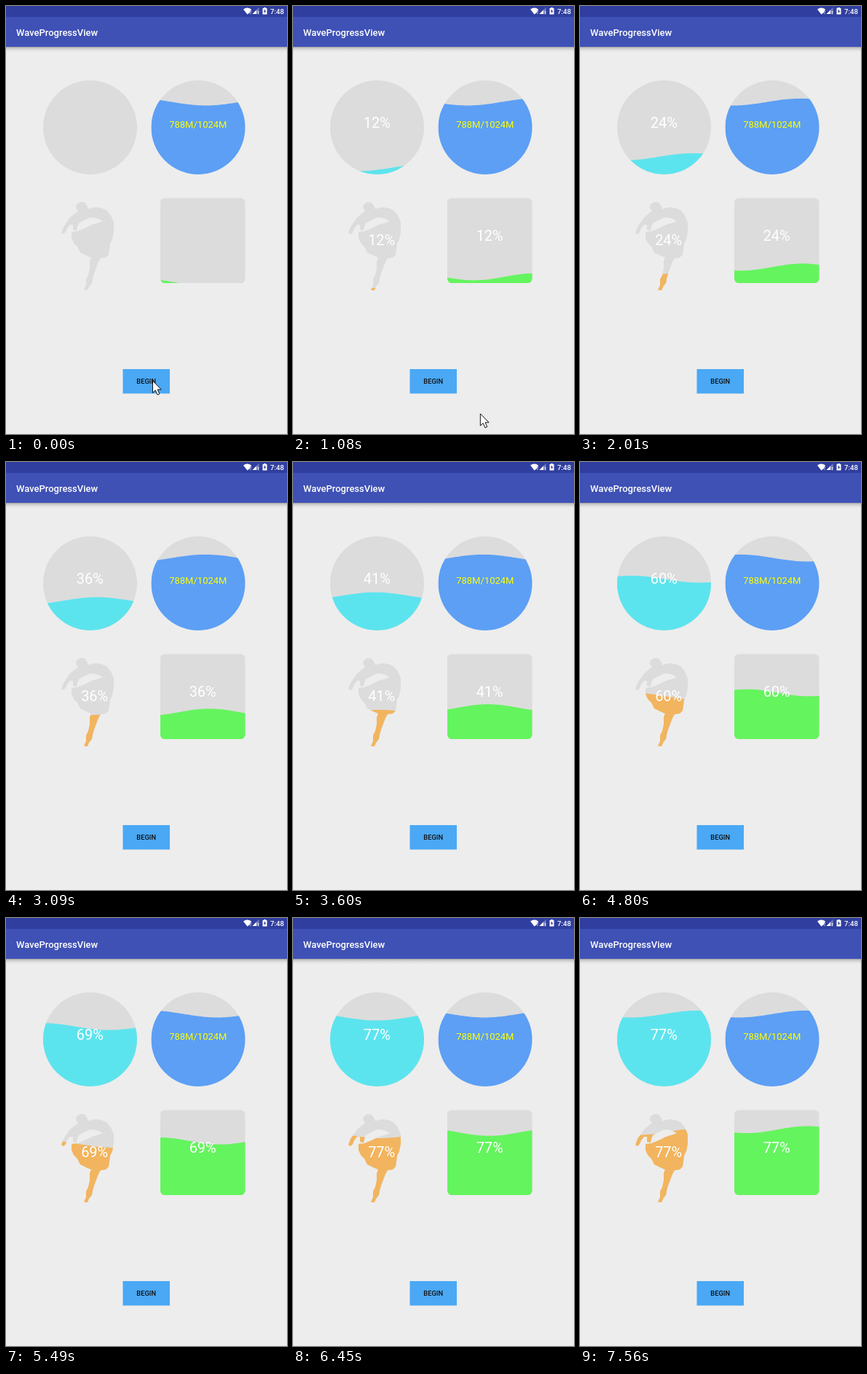
Write an HTML page that moves like this. It is 386 by 587 pixels and loops after 7.66 s.

```html
<!DOCTYPE html>
<html lang="en">
<head>
<meta charset="utf-8">
<title>WaveProgressView</title>
<style>
  html, body { margin: 0; width: 100%; height: 100%; overflow: hidden; background: #ededed; }
  svg { display: block; width: 386px; height: 587px; font-family: Roboto, sans-serif; }
  .medium { font-weight: 500; }
  .percent { font-size: 20px; fill: #fff; text-anchor: middle; }
</style>
</head>
<body>
<svg viewBox="0 0 386 587">
  <defs>
    <linearGradient id="shadow" x2="0" y2="1">
      <stop offset="0" stop-color="#000" stop-opacity=".3"/>
      <stop offset=".4" stop-color="#000" stop-opacity=".1"/>
      <stop offset="1" stop-color="#000" stop-opacity="0"/>
    </linearGradient>
  </defs>
  <rect width="386" height="587" fill="#ededed"/>
  <rect y="56" width="386" height="7" fill="url(#shadow)"/>
  <rect y="14" width="386" height="42" fill="#3f51b5"/>
  <rect width="386" height="15" fill="#303f9f"/>
  <text class="medium" x="14" y="41" font-size="13" fill="#fff">WaveProgressView</text>

  <g fill="#fff">
    <path d="M326 4.5Q331.5 .5 337 4.5L335 7V9L331.5 11.5Z"/>
    <path d="M336 5V9M336 10V11" stroke="#fff"/>
    <path d="M338.5 11L347.5 2V11Z" opacity=".35"/>
    <path d="M338.5 11L344 5.5V11ZM346 7h1.2v2.5H346ZM346 10.2h1.2v1H346Z"/>
    <path d="M352.5 3h1.7V2h2.6v1h1.7v8.5h-6Z"/>
    <path d="M356 4.2L353.8 7.7H355.2V10.2L357.3 6.7H356Z" fill="#303f9f"/>
    <text class="medium" x="363" y="10.7" font-size="9.6">7:48</text>
  </g>

  <g id="views"></g>
  <text x="263.8" y="166.5" font-size="13" fill="#ff0" text-anchor="middle">788M/1024M</text>

  <rect x="160.5" y="498" width="64.5" height="33.5" fill="#4aa8f4"/>
  <text class="medium" x="192.7" y="518.2" font-size="9.3" fill="#111" text-anchor="middle">BEGIN</text>
  <path id="cursor" d="M0 0V16.5L3.8 13L6.6 19.3L9.4 18L6.7 12H11.8Z" fill="#fff" stroke="#111" stroke-linejoin="round"/>
</svg>
<script>
const LOOP = 7660;
const NS = 'http://www.w3.org/2000/svg';
const AMPLITUDE = 4.8;
const GRAY = '#dcdcdc';

const DANCER = 'M97 272L102 269L108 269.5L112 275L113 278.5L122 276L131 277L138 280L144 287' +
  'L148 297V310L146 320L143 326L142 334L141 341L137 345L130 346L127 351L124 359L121 367' +
  'L119 374L118 380L114 385L112 390L107 389.5L110 383V375L113 369L115 360V350L117 345' +
  'L110 342L102 338L98 330L93 325L90 318V310L98 309L108 305L118 300L128 297L133 295' +
  'L125 291L116 290L107 294L100 298L98 303L97 308L92 307V300L88 300L84 305L82 310' +
  'L79 313L76 311L79 303L83 297L88 290L94 285L99 281L96 277Z';

// Each key is [time, value].
const PROGRESS = [[60, 0], [2010, 24], [3090, 36], [4140, 51], [5490, 69], [6100, 77]];
const LEVEL = [[500, 0], [2010, 18.7], [3090, 31.6], [4140, 45.3], [5490, 63.7], [6450, 74], [7000, 77]];
const TROUGH = [[0, .405], [2010, .06], [3090, -.1], [4140, -.275], [5490, -.51], [6450, -.66], [7560, -.9]];
const CURSOR_X = [[500, 201.5], [1080, 255], [1500, 320]];
const CURSOR_Y = [[500, 514], [1080, 558], [1500, 590]];
const BEATS = [150, 1230, 2280, 3360, 4410, 5490, 6570, 7701];

function keyed(keys, t) {
  if (t <= keys[0][0]) return keys[0][1];
  for (let i = 1; i < keys.length; i++) {
    const [t0, a] = keys[i - 1], [t1, b] = keys[i];
    if (t <= t1) return a + (b - a) * (t - t0) / (t1 - t0);
  }
  return keys[keys.length - 1][1];
}

// Eight picture changes per beat.
function stepped(t) {
  t += 15;
  for (let i = BEATS.length - 2; i >= 0; i--) {
    if (t >= BEATS[i]) {
      const step = (BEATS[i + 1] - BEATS[i]) / 8;
      return BEATS[i] + Math.floor((t - BEATS[i]) / step) * step;
    }
  }
  return 0;
}

function add(parent, tag, attrs) {
  const node = document.createElementNS(NS, tag);
  for (const name in attrs) node.setAttribute(name, attrs[name]);
  return parent.appendChild(node);
}

const root = document.getElementById('views');
const cursor = document.getElementById('cursor');

function makeView(id, box, color, tag, shape, label, fixedLevel) {
  const clip = add(root, 'clipPath', { id });
  add(clip, tag, shape);
  add(root, tag, { ...shape, fill: GRAY });
  const wave = add(root, 'path', { fill: color, 'clip-path': `url(#${id})` });
  const text = label && add(root, 'text', { class: 'percent', x: label[0], y: label[1] });
  return { ...box, wave, text, fixedLevel };
}

const disc = cx => ({ cx, cy: 166.5, r: 64.5 });
const views = [
  makeView('cyan', { left: 51, width: 129, bottom: 231, height: 129 },
    '#5ce4ee', 'circle', disc(115.5), [115.3, 166.5]),
  makeView('blue', { left: 199.5, width: 129, bottom: 231, height: 129 },
    '#5c9ff5', 'circle', disc(264), null, 77),
  makeView('dancer', { left: 57, width: 129, bottom: 392, height: 128.5 },
    '#f2b45e', 'path', { d: DANCER }, [121.7, 328]),
  makeView('square', { left: 212, width: 116.5, bottom: 380, height: 116.5 },
    '#64f45e', 'rect', { x: 212, y: 263.5, width: 116.5, height: 116.5, rx: 6 }, [270.2, 322])
];

function wavePath({ left, width, bottom, height }, level, trough) {
  const mid = bottom - height * level / 100;
  const length = width * 1.44;
  let d = `M${left} ${bottom + 9}`;
  for (let x = 0; x <= width + 2; x += 2) {
    const y = mid + AMPLITUDE * Math.cos(2 * Math.PI * (x / length - trough));
    d += `L${left + x} ${y.toFixed(2)}`;
  }
  return d + `V${bottom + 9}Z`;
}

function draw(time) {
  const t = stepped(time);
  const level = keyed(LEVEL, t);
  const trough = keyed(TROUGH, t);
  const percent = Math.floor(keyed(PROGRESS, t) + 1e-6);
  for (const view of views) {
    view.wave.setAttribute('d', wavePath(view, view.fixedLevel ?? level, trough));
    if (view.text) view.text.textContent = percent > 0 ? percent + '%' : '';
  }
  cursor.setAttribute('transform', `translate(${keyed(CURSOR_X, t)} ${keyed(CURSOR_Y, t)})`);
}

const start = performance.now();
function tick() {
  draw((performance.now() - start) % LOOP);
  requestAnimationFrame(tick);
}
tick();
</script>
</body>
</html>
```
